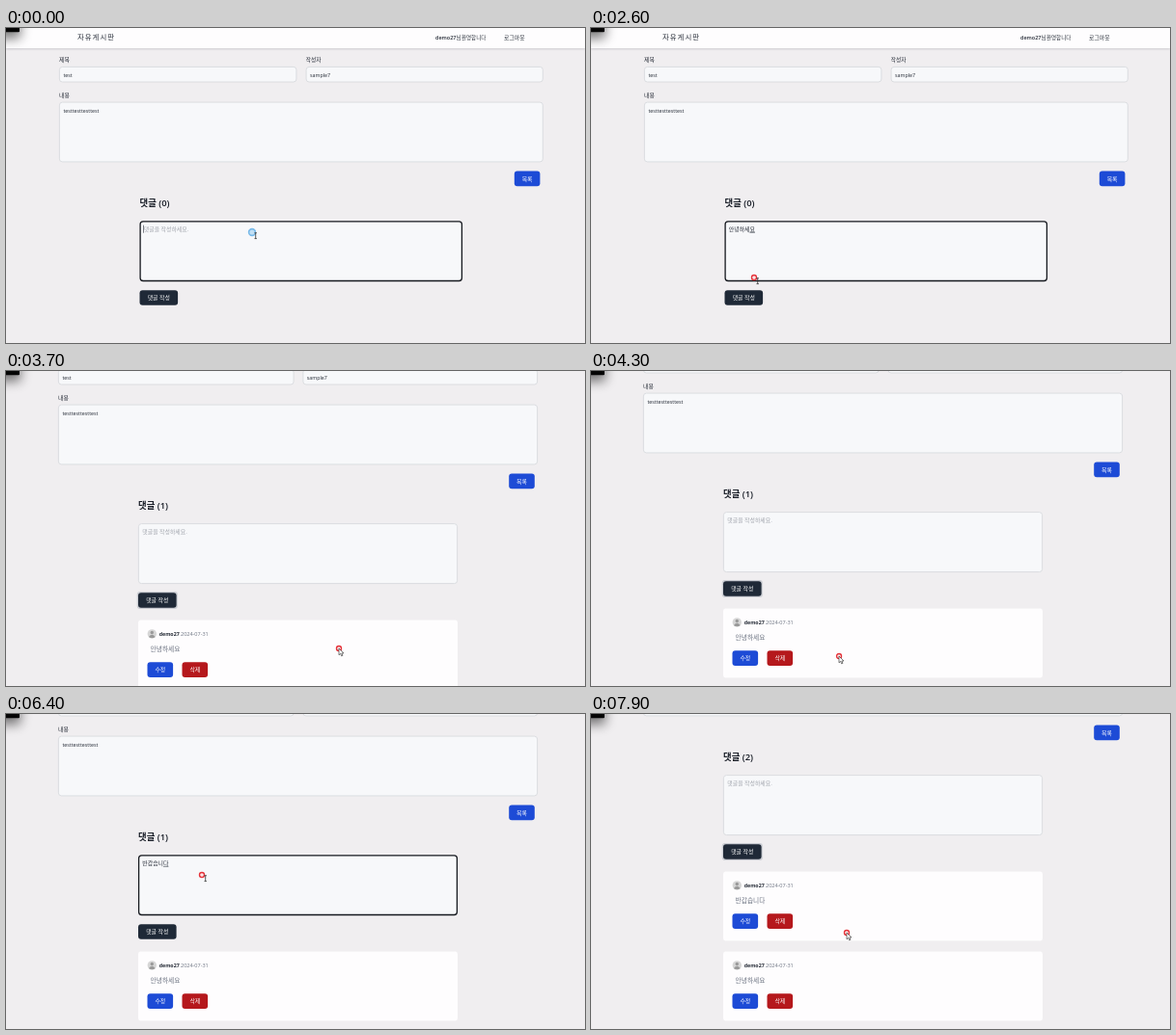
An HTML page that plays this animation: 600x327 px, repeating every 8 s.

```html
<!DOCTYPE html>
<html lang="ko">
<head>
<meta charset="utf-8">
<style>
html, body { margin: 0; width: 100%; height: 100%; overflow: hidden; background: #f0eef0; }
svg { display: block; width: 600px; height: 327px; font-family: "Open Sans", "Noto Sans CJK KR", "Noto Sans CJK", sans-serif; white-space: pre; }
</style>
</head>
<body>
<svg viewBox="0 0 600 327">
  <defs>
    <filter id="blur" x="-2" y="-2" width="5" height="5"><feGaussianBlur stdDeviation="6"/></filter>
    <filter id="soft" x="-.1" y="-.5" width="1.2" height="2"><feGaussianBlur stdDeviation="1"/></filter>
  </defs>
  <g id="page"></g>
  <rect x="-12" y="-12" width="27" height="23" fill="#000" opacity=".5" filter="url(#blur)"/>
  <path d="M0 0H14V3.2Q14 4.2 13 4.2H0Z" fill="#050505"/>
  <g id="pointer"></g>
</svg>
<script>
const LOOP = 8000, STEP = 100;
const INK = '#252b36', GRAY = '#6b7280', BLUE = '#1d4bd6', RED = '#b5181c';
const NAME = 'demo27', AUTHOR = 'sample7';
const HELLO = 'ㅇ 아 안 안ㄴ 안녀 안녕 안녕ㅎ 안녕하 안녕핫 안녕하세 안녕하셍 안녕하세요'.split(' ');
const GLAD = 'ㅂ 바 반 반ㄱ 반가 반갑 반갑ㅅ 반갑스 반갑습 반갑습ㄴ 반갑습니 반갑습닏 반갑습니다'.split(' ');

// [time, value...]
const SCROLL = [[3400, 0], [3500, 4], [3600, 21], [3700, 42], [3800, 54], [7700, 54], [7800, 96], [7900, 137]];
const MOUSE = [[0, 255, 212], [1900, 255, 212], [2600, 169, 259], [2700, 150, 277], [2900, 150, 277],
  [3400, 360, 283], [3700, 345, 288], [4300, 257, 296], [4500, 257, 296], [4900, 203, 167],
  [6700, 203, 167], [7000, 115, 228], [7300, 139, 224], [7600, 139, 224], [7800, 255, 229], [7900, 265, 227]];

function sample(keys, t) {
  const i = keys.findIndex(k => k[0] > t);
  if (i === 0) return keys[0].slice(1);
  if (i < 0) return keys[keys.length - 1].slice(1);
  const a = keys[i - 1], b = keys[i], f = (t - a[0]) / (b[0] - a[0]);
  return a.slice(1).map((v, j) => v + (b[j + 1] - v) * f);
}

const box = (x, y, w, h, fill, extra = '') =>
  `<rect x="${x}" y="${y}" width="${w}" height="${h}" rx="3" fill="${fill}" ${extra}/>`;
const text = (x, cy, str, size, fill = INK, extra = '') =>
  `<text x="${x}" y="${cy + size * .37}" font-size="${size}" fill="${fill}" ${extra}>${str}</text>`;
const field = (x, y, w, h) => box(x + .4, y + .4, w - .8, h - .8, '#f7f8fa', 'stroke="#d5d7db" stroke-width=".8"');
const button = (x, y, w, label, fill) => box(x, y, w, 15.6, fill) +
  text(x + w / 2, y + 7.8, label, 5.9, '#fff', 'text-anchor="middle" font-weight="500"');

function typed(t) {
  if (t < 500 || (t >= 2900 && t < 5300) || t >= 7700) return '';
  if (t < 2900) return HELLO[t < 900 ? (t - 500) / 100 : t < 1000 ? 3 : Math.min(11, (t - 1000) / 100 + 4)];
  return GLAD[Math.min(12, Math.round((t - 5300) / 1000 * 12))];
}

function commentBox(t, x, w) {
  const focused = t < 2800 || (t >= 4900 && t < 7200);
  const str = typed(t), tx = x + 4.3, size = 5.9;
  let out = focused
    ? box(x + .6, 200.8, w - 1.2, 61.7, '#f7f8fa', 'stroke="#15181e" stroke-width="1.3"')
    : field(x, 200.2, w, 62.8);
  if (!str) out += text(tx, 208.7, '댓글을 작성하세요.', size, '#a0a4ac');
  else if (!focused) out += text(tx, 208.7, str, size);
  else out += text(tx, 208.7, `${str.slice(0, -1)}<tspan text-decoration="underline">${str.slice(-1)}</tspan>`, size);
  const typing = (t >= 500 && t < 1800) || (t >= 5300 && t < 6300);
  if (focused && (typing || t % 1000 < 400)) {
    out += `<rect x="${tx + str.length * size * .92 - .4}" y="204.7" width=".6" height="8" fill="${INK}"/>`;
  }
  return out;
}

function card(y, message) {
  return box(137, y, 331, 72, '#fefdfe') +
    `<circle cx="151.3" cy="${y + 14.4}" r="4.7" fill="#d6d6d6"/>
     <circle cx="151.3" cy="${y + 13}" r="1.7" fill="#999"/>
     <path d="M148 ${y + 17.5}q3.3 -4.6 6.6 0q-3.3 2.4 -6.6 0" fill="#999"/>` +
    text(158.7, y + 14.6, NAME, 5.3, INK, 'font-weight="700"') +
    text(181, y + 14.6, '2024-07-31', 5.5, GRAY) +
    text(149.6, y + 29.6, message, 6.7, GRAY) +
    button(146.5, y + 43.8, 26.6, '수정', BLUE) +
    button(182.5, y + 43.8, 26.6, '삭제', RED);
}

function page(t, hover) {
  const wide = t < 2900, count = wide ? 0 : t < 7700 ? 1 : 2;
  const pick = (a, b) => wide ? a : b;
  const left = pick(55, 54), mid = pick(310.7, 307.5), cx = pick(138.5, 137);
  const ring = (t >= 2800 && t < 4900) || t >= 7200;
  let out = `<rect y="1" width="600" height="21" fill="#aaa9b0" opacity=".5" filter="url(#soft)"/>
    <rect width="600" height="21" fill="#fefdfe"/>` +
    text(pick(74, 71), 9.5, '자유게시판', 7.4, INK, 'font-weight="500" letter-spacing="1"') +
    text(pick(445, 441.5), 9.8, NAME + '<tspan font-weight="400">님</tspan>', 5.5, INK, 'font-weight="600"') +
    text(pick(472, 468.7), 9.8, '환영합니다', 5.5) +
    text(pick(516, 512.5), 9.8, '로그아웃', 5.9) +
    text(left, 33, '제목', 5.9) + text(mid, 33, '작성자', 5.7) + text(left, 70, '내용', 5.9) +
    field(left, 40, pick(246.3, 244.5), 16.4) + field(mid, 40, pick(246, 243.5), 16.4) +
    field(left, 76.7, pick(501.7, 497), 62.6) +
    text(left + 4.5, 48.6, 'test', 5.3) + text(mid + 4.3, 48.6, AUTHOR, 5.3) +
    text(left + 4.5, 85.6, 'testtesttesttest', 5.3) +
    button(pick(526.8, 521.2), 148.6, 26.6, '목록', BLUE) +
    text(cx, 182, `댓글 (${count})`, 9.4, '#171c26', 'font-weight="600"') +
    commentBox(t, cx, pick(334.5, 331));
  if (ring) out += box(cx - 1.2, 271, 42, 18, '#c5c8ce', 'opacity=".85"');
  out += button(cx, 272.2, 39.6, '댓글 작성', hover ? '#111827' : '#1f2937');
  if (count) out += card(300.5, count === 2 ? '반갑습니다' : '안녕하세요');
  if (count === 2) out += card(383.5, '안녕하세요');
  return out;
}

function pointer(t, x, y, kind) {
  const click = t < 200 || (t >= 2800 && t < 3000) || (t >= 4900 && t < 5100) || (t >= 7200 && t < 7500);
  const halo = click
    ? '<circle r="3.4" fill="#b9dcf5" stroke="#62afe6" stroke-width="1.6" opacity=".85"/>'
    : '<circle r="2.5" fill="#fbe3e4" stroke="#e5343b" stroke-width="1.4"/>';
  const shape = {
    text: '<path d="M2.5 .7h2.4M3.7 .7V6.6M2.5 6.6h2.4" fill="none" stroke="#333" stroke-width=".8"/>',
    hand: '<path d="M2 0q1 -.6 1.4 .5v2.4l3 .8q.8 .4 .6 1.6l-.8 2.7h-3.4l-2.5 -3.2q.2 -1 1.5 -.1z" fill="#fff" stroke="#111" stroke-width=".6"/>',
    arrow: '<path d="M0 0V6.8L1.6 5.4L2.7 7.9L3.9 7.4L2.8 5H4.9Z" fill="#fff" stroke="#222" stroke-width=".6"/>'
  }[kind];
  return `<g transform="translate(${x} ${y})">${halo}${shape}</g>`;
}

const pageLayer = document.getElementById('page'), pointerLayer = document.getElementById('pointer');
let shown = -1;

function render(t) {
  const [scroll] = sample(SCROLL, t), [x, y] = sample(MOUSE, t), py = y + scroll;
  const inside = (right, top, bottom) => x > 137 && x < right && py > top && py < bottom;
  const kind = inside(470, 200, 263) ? 'text' : inside(178, 272, 288) ? 'hand' : 'arrow';
  pageLayer.setAttribute('transform', `translate(0 ${-scroll})`);
  pageLayer.innerHTML = page(t, kind === 'hand');
  pointerLayer.innerHTML = pointer(t, x, y, kind);
}

function tick() {
  const t = Math.floor(performance.now() % LOOP / STEP) * STEP;
  if (t !== shown) render(shown = t);
  requestAnimationFrame(tick);
}
tick();
</script>
</body>
</html>
```
